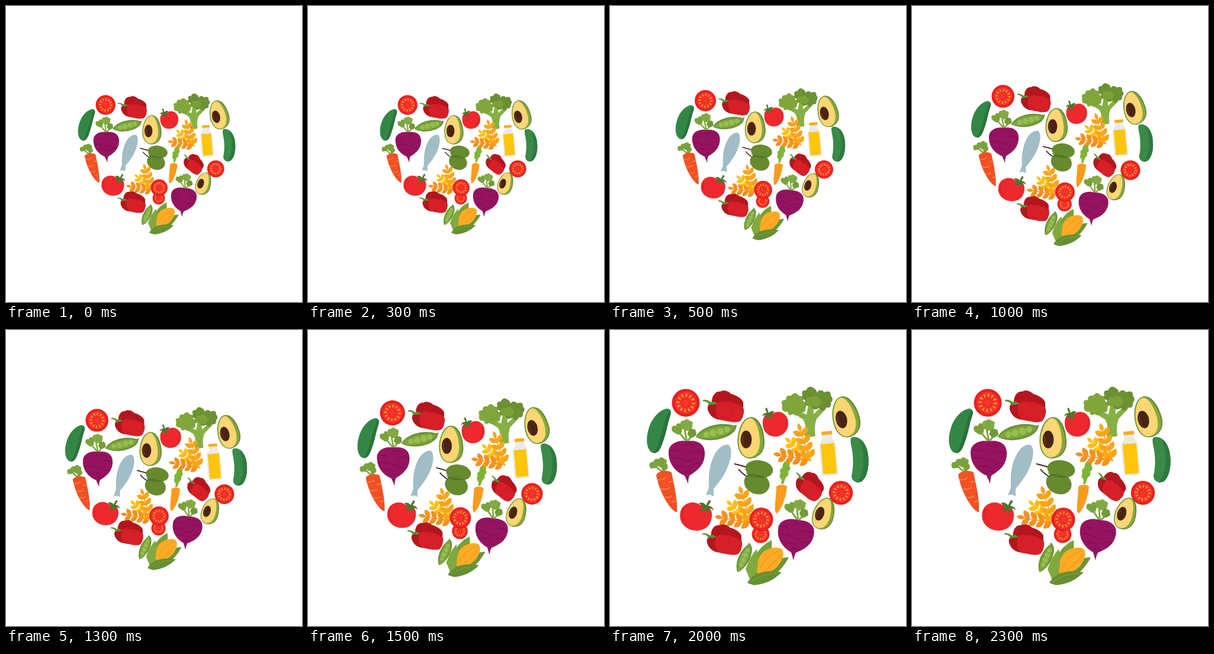
Write an HTML page that moves like this. It is 500x500 px and loops after 2500 ms.

```html
<!DOCTYPE html>
<html lang="en">
<head>
<meta charset="utf-8">
<title>Healthy heart</title>
<style>
  html, body { margin: 0; width: 100%; height: 100%; overflow: hidden; background: #fff; }
  svg { display: block; width: 100%; height: 100%; }
</style>
</head>
<body>
<svg viewBox="0 0 500 500">
  <defs>
    <g id="slice">
      <circle r="23.500" fill="#e9201f"/>
      <circle r="18.500" fill="#f5352a"/>
      <circle r="13" fill="none" stroke="#fcae35" stroke-width="5" pathLength="36" stroke-dasharray="1 2"/>
      <circle r="7" fill="none" stroke="#e52620" stroke-width="1.5"/>
    </g>

    <!-- Centred on the body -->
    <g id="pepper">
      <path fill="#b3161e" d="M-20-9C-20-19-14-27-6-26C0-30 8-27 13-22C21-20 31-14 33-8V2L-4 22C-14 21-22 17-26 7C-29 0-26-6-20-9Z"/>
      <path fill="#d61f27" d="M-13 4C-13-9-3-12 4-8C12-10 26-4 33 1C36 8 33 13 32 18L28 24C18 28 8 24 0 23C-9 22-14 14-13 4Z"/>
      <path fill="none" stroke="#c61b22" d="M8-6C12-2 14 3 14 9M-8 12C-3 17 3 19 10 19"/>
      <path fill="#5f8f33" d="M-35-12Q-27-13-22-8Q-14-11-10-4Q-15-6-18-3Q-21-6-25-2Q-24-9-35-10Z"/>
    </g>

    <g id="avocado">
      <path fill="#5d8730" d="M0-35C14-35 22-15 23 5C24 25 12 35-2 35C-16 34-23 20-22.500 4C-22-14-14-34 0-35Z"/>
      <path fill="#87a83d" d="M1-34C11-33 20-13 21 5C22 24 11 34-2 34C-15 33-22 19-21.500 4C-21-14-13-33 1-34Z"/>
      <path fill="#fbd673" d="M-1-33C8-32 14-14 15 3C16 22 8 33-4 33C-15 32-21 19-20.500 4C-20-14-11-33-1-33Z"/>
      <ellipse cx="-8" cy="3" rx="9.500" ry="15" fill="#4a2413"/>
      <path fill="none" stroke="#693819" stroke-width="2" d="M-13-4Q-16 4-12 11"/>
    </g>

    <g id="beet">
      <g fill="none" stroke="#7fa63d" stroke-width="3">
        <path d="M0-22L-4-42M-1-22L-16-40M1-22L10-34"/>
      </g>
      <path fill="#7aa23c" d="M-26-44Q-25-50-18-48Q-18-54-12-52Q-8-52-8-46L-9-37Q-14-30-20-36Q-26-38-26-44Z"/>
      <path fill="#83aa42" d="M-11-50Q-12-58-5-57Q0-62 4-57Q12-56 9-49Q10-43 4-43Q0-36-5-42Q-12-43-11-50Z"/>
      <path fill="#719a38" d="M2-38Q3-46 9-43Q15-43 15-38Q18-32 12-30Q6-25 3-31Q-1-34 2-38Z"/>
      <path fill="#951360" d="M-31-5C-30-18-15-25 0-22C16-25 30-18 30-3C31 19 15 29 4 36Q2 42 2 50Q-1 42-4 36C-18 30-32 17-31-5Z"/>
      <path fill="none" stroke="#740e4d" d="M-29-7Q-19-9-12-4M-4-15Q8-18 17-13M8-4Q19-7 30-1M-28 7Q-16 4-6 9T12 8M10 17Q17 14 25 16M-19 21Q-8 17 4 23M-5 31Q2 27 9 30"/>
    </g>

    <g id="pod">
      <path fill="#6b9336" d="M-37 2C-27-13 8-19 32-7L37-8L35-3C29 14-16 19-37 2Z"/>
      <path fill="#80a83f" d="M-34 2C-22-10 9-14 32-4C22 10-15 14-34 2Z"/>
      <g fill="#97bd50" stroke="#759f3b">
        <circle cx="-18" cy="1" r="6"/><circle cx="-6" r="7"/>
        <circle cx="7" cy="-1" r="7"/><circle cx="19" cy="-2" r="6"/>
      </g>
    </g>

    <g id="tomato">
      <path fill="#ee292e" d="M-21 2C-22-11-13-18-4-15C8-23 23-13 22 2C22 16 11 24 0 24C-12 24-21 15-21 2Z"/>
      <path fill="none" stroke="#dc2027" stroke-width="1.500" d="M18-8Q22 6 11 17"/>
      <path fill="#4d762c" d="M-14-25L-11-16Q-7-21-1-18L-7-13Q-4-9-6-5Q-10-7-11-10L-15-5Q-18-9-15-12Q-19-13-22-10Q-21-16-14-16L-17-23Z"/>
    </g>

    <path id="grain" d="M0 0C-8-1-12-8-9-15C0-13 3-7 0 0Z"/>
    <g id="pair">
      <use href="#grain" transform="rotate(-14)"/>
      <use href="#grain" transform="scale(-1 1) rotate(-14)"/>
    </g>
    <g id="ear">
      <path d="M0 2V-56" fill="none" stroke="currentColor" stroke-width="2"/>
      <g fill="currentColor">
        <use href="#pair" y="-4"/><use href="#pair" y="-17"/>
        <use href="#pair" y="-30"/><use href="#pair" y="-43"/>
        <path d="M0-51Q-7-58 0-66Q7-58 0-51Z"/>
      </g>
    </g>
    <g id="wheat">
      <use href="#ear" color="#fdbf12" transform="rotate(-48) scale(.86)"/>
      <use href="#ear" color="#f4911e" transform="rotate(-80) scale(.96)"/>
      <use href="#ear" color="#f9a51b" transform="rotate(-18)"/>
    </g>
  </defs>

  <g id="heart">
    <use href="#slice" x="128" y="123"/>
    <use href="#slice" transform="translate(390 275) scale(.86)"/>
    <use href="#pepper" x="192" y="130"/>
    <use href="#pepper" transform="translate(190 355) scale(.97)"/>
    <use href="#pepper" transform="translate(335 262) rotate(28) scale(.8)"/>

    <!-- Broccoli -->
    <path fill="#86b043" d="M329 180Q333 161 326 151L307 139L313 133L332 143L336 122H343L344 142L359 128L365 133L349 150Q344 163 347 179Q338 182 329 180Z"/>
    <path fill="#80a63b" d="M291 127Q287 118 297 118Q297 109 306 111Q313 102 319 111Q328 111 326 120Q335 124 330 132Q332 140 322 139Q317 148 309 142Q301 147 300 138Q288 139 291 127Z"/>
    <path fill="#6b9133" d="M325 110Q322 101 331 102Q336 92 344 98Q350 101 349 106Q355 98 362 105Q374 101 373 111Q379 117 373 123Q374 133 365 131Q360 141 353 132Q342 138 340 128Q327 130 330 119Q322 116 325 110Z"/>
    <path fill="#7ba139" d="M331 119Q333 111 341 114Q349 108 353 116Q360 120 354 126Q350 133 343 128Q331 130 331 119Z"/>

    <use href="#avocado" transform="translate(398 146.500) rotate(-13)"/>
    <use href="#avocado" x="238" y="182"/>
    <use href="#avocado" transform="translate(361 310) rotate(18) scale(.79)"/>

    <!-- Cucumbers -->
    <path fill="#348646" d="M95 133C101 132 104 137 102 144C97 158 95 175 89 190C85 204 79 210 71 207C62 202 60 185 65 168C70 150 82 136 95 133Z"/>
    <path fill="#2a743b" d="M101 135C104 138 103 141 102 144C97 158 95 175 89 190C85 202 80 209 74 208C87 191 87 160 101 135Z"/>
    <path fill="#3a8a48" d="M409 181C418 178 430 186 435 205C439 225 436 248 425 256C416 260 408 255 408 246C412 228 411 210 407 193C406 186 406 182 409 181Z"/>
    <path fill="#2e7a40" d="M421 183C430 188 434 200 435 205C439 225 436 248 425 256L417 258C432 239 431 208 421 183Z"/>

    <use href="#beet" x="130" y="210"/>
    <use href="#beet" transform="translate(314.500 342) rotate(8) scale(1 .95)"/>
    <use href="#pod" transform="translate(180 173) rotate(-9) scale(.97)"/>
    <use href="#pod" transform="translate(227 385) rotate(-62) scale(.72)"/>

    <!-- Fish -->
    <path fill="#a1bdc6" d="M200 194C208 200 205 220 196 238C190 250 182 260 175 268L175 281L169 278L162 279L167 266C166 245 168 225 178 208C185 197 193 193 200 194Z"/>

    <!-- Olives -->
    <path fill="none" stroke="#3c2318" stroke-width="2" d="M210 226Q222 229 235 233M217 235Q222 242 234 249"/>
    <ellipse cx="252" cy="235" rx="23.500" ry="15" transform="rotate(8 252 235)" fill="#668a2e"/>
    <ellipse cx="248" cy="259" rx="22" ry="18" transform="rotate(22 248 259)" fill="#668a2e"/>
    <path fill="none" stroke="#496b27" stroke-width="1.500" d="M230 241Q240 250 261 248M231 248Q240 240 258 249"/>

    <!-- Carrots -->
    <path fill="none" stroke="#7aa23c" stroke-width="3" d="M90 240L86 222M88 240L75 228M91 239L94 231"/>
    <path fill="#7aa23c" d="M67 231Q65 222 73 223Q76 216 82 218Q87 212 92 218Q98 219 95 225Q101 232 95 236Q90 239 88 232Q84 233 80 229Q78 235 73 233Q69 236 67 231Z"/>
    <path fill="#f15124" d="M78 245C81 237 100 236 104 241C108 260 115 290 113 308C104 306 85 280 78 245Z"/>
    <path fill="none" stroke="#fb8b4a" stroke-width="1.500" d="M80 253Q89 254 94 249M99 258Q104 255 107 256M86 268Q94 271 101 266M93 282Q100 285 104 280M105 291L111 288"/>
    <path fill="#7fb536" d="M299 220Q306 223 303 229Q307 235 301 239Q303 246 297 249L293 260H289L290 253Q284 248 288 242Q285 235 291 233Q292 222 299 220Z"/>
    <path fill="#f99b1c" d="M281 265C285 260 296 260 299 265C297 285 289 305 281 310C276 305 281 282 281 265Z"/>

    <use href="#tomato" x="279" y="156"/>
    <use href="#tomato" transform="translate(146 312) rotate(8) scale(-1.250 1.120)"/>
    <use href="#wheat" x="338" y="220"/>
    <use href="#wheat" x="239" y="326"/>
    <use href="#slice" transform="translate(254.500 345) scale(.63)"/>
    <use href="#slice" transform="translate(255.500 320) scale(.85)"/>

    <!-- Bottle -->
    <g transform="translate(366 171) rotate(-5)">
      <path fill="#eceae5" d="M-8 5H8L9 14Q13 18 13 25V72Q13 75 10 75H-12Q-15 75-15 72V25Q-14 18-9 14Z"/>
      <path fill="#fdc50b" d="M-12 21H11V70Q11 72 9 72H-10Q-12 72-12 70Z"/>
      <rect x="-9" width="18" height="6" rx="1" fill="#f7ad1c"/>
    </g>

    <!-- Corn -->
    <path fill="#76a039" d="M273 355C253 365 240 382 239 411L252 415C270 399 275 374 273 355Z"/>
    <path fill="#6b9535" d="M302 384C285 383 261 398 253 416L267 418C280 415 293 401 302 384Z"/>
    <path fill="#fbab26" d="M290 370C297 377 290 397 275 406C262 414 248 416 248 407C247 393 252 377 265 371C274 367 285 366 290 370Z"/>
    <path fill="none" stroke="#f39a20" stroke-width="1.500" d="M254 403Q263 381 286 373M262 405Q277 396 288 379"/>
    <path fill="#80aa3e" d="M248 370C235 384 231 400 229 404L238 425C248 415 253 398 248 370Z"/>
    <path fill="#668f33" d="M232 427C240 411 262 404 290 409C279 421 262 430 243 431L234 428Z"/>
    <path fill="none" stroke="#80aa3e" d="M237 426Q256 412 282 411"/>
  </g>
</svg>
<script>
  const heart = document.getElementById("heart");
  const stepMs = 500;
  // Scale and centre of the heart at each beat
  const poses = [
    [0.71, 254.5, 266.5],
    [0.765, 254, 267],
    [0.821, 253.5, 267.5],
    [0.9, 252, 266],
    [1, 249.5, 263],
  ];

  function draw() {
    const step = Math.floor(performance.now() / stepMs) % poses.length;
    const [scale, x, y] = poses[step];
    heart.setAttribute("transform", `translate(${x} ${y}) scale(${scale}) translate(-249.5 -263)`);
    requestAnimationFrame(draw);
  }
  draw();
</script>
</body>
</html>
```
